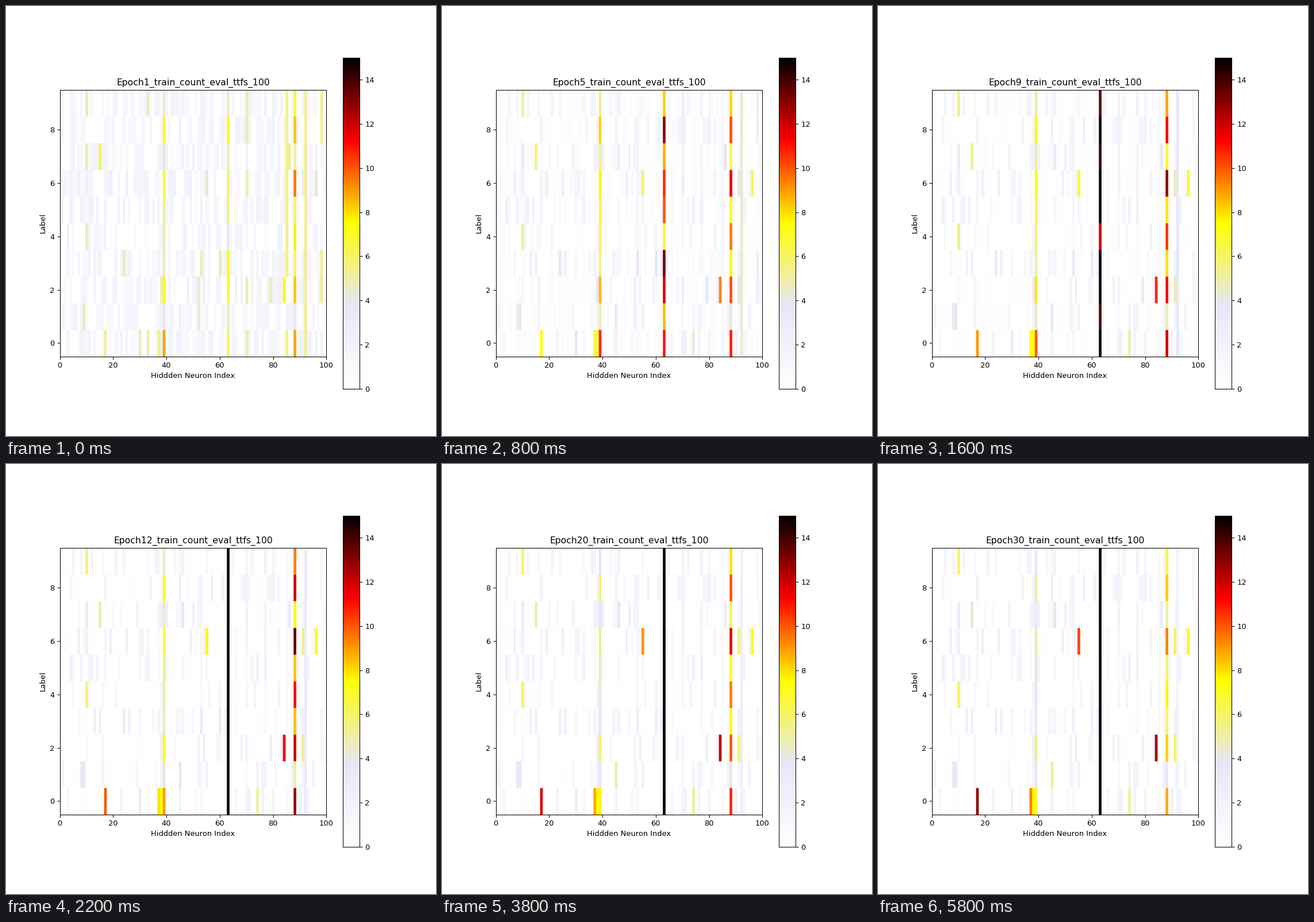
A matplotlib script for the animation above (6000 ms loop, 748 px wide and 748 px high).

```python
import numpy as np
import matplotlib.pyplot as plt
from matplotlib.animation import FuncAnimation
from matplotlib.colors import LinearSegmentedColormap

EPOCHS, LABELS, NEURONS, VMAX = 30, 10, 100, 15
ALL = range(LABELS)
epochs = np.arange(1, EPOCHS + 1)
rng = np.random.default_rng(4)


def curve(at, values):
    return np.interp(epochs, at, values)


def settle(start, end, tau):
    """Exponential approach from start to end."""
    return end + (start - end) * np.exp(-(epochs - 1) / tau)


def background():
    """Sparse weak cells that stay, plus early activity that dies out."""
    shape = (LABELS, NEURONS)
    chance = np.full(NEURONS, 0.15)
    chance[[37, 38, 45, 53, 70, 77]] = 0.7
    steady = (rng.random(shape) < chance) * rng.uniform(0.8, 2.2, shape)
    early = (rng.random(shape) < 0.45) * rng.uniform(0.6, 2, shape)
    fade = settle(1, 0.05, 3)[:, None, None]
    return np.maximum(steady, early * fade)


counts = background()


def drift(neuron, labels, start, end, tau):
    for label in labels:
        counts[:, label, neuron] = settle(start, end, tau)


# Neurons that fire early for many labels, then go quiet.
drift(92, ALL, 5.5, 1.5, 12)
drift(85, [0, 3, 4, 5, 6, 7, 8, 9], 5.6, 0.8, 2)
drift(70, [0, 2, 6, 8, 9], 4.9, 1.6, 3)
drift(98, [2, 3, 8, 9], 5.5, 1.3, 3)
drift(52, [1, 2], 4.4, 1.6, 3)
drift(33, [0, 9], 4.8, 0.8, 2)
drift(10, [7], 5, 3.2, 2)
drift(86, [7], 5, 3, 5)
for label, neuron in [(0, 30), (2, 38), (2, 79), (3, 24), (3, 53), (3, 60)]:
    drift(neuron, [label], 4.8, 2.2, 8)

# Neurons that specialise on one label.
drift(17, [0], 5.2, 14, 14)
drift(37, [0], 5.5, 10, 14)
drift(38, [0], 3, 7.6, 3)
drift(74, [0], 1.8, 5.2, 3)
drift(8, [1], 2, 3.4, 3)
drift(9, [1], 4.8, 3, 14)
drift(45, [1], 2, 5.8, 14)
drift(84, [2], 7, 12.8, 8)
drift(10, [4, 9], 4.8, 6.3, 12)
drift(55, [6], 4.4, 12, 20)
drift(91, [2, 6], 2.8, 6.2, 8)
drift(96, [6], 4.3, 7.4, 5)
drift(15, [7], 6, 4, 18)
drift(46, [7], 2, 4.1, 10)

# Hub neurons: one strength per label times a shared course.
hub39 = np.array([10.7, 5, 8.5, 5.4, 6, 6.3, 7.6, 5.2, 8.1, 5.3])
hub63 = np.array([10.9, 8.4, 11.8, 13.4, 6.5, 10, 10.5, 8.7, 12.9, 8.2])
hub88 = np.array([12.7, 5, 11.9, 8.4, 11.1, 8.3, 13.6, 7.3, 11.9, 9.4])
decay = curve([1, 5, 9, 12, 17, 30], [0.83, 1, 0.93, 0.84, 0.73, 0.64])
swell = curve([1, 5, 9, 12, 17, 24, 30],
              [0.7, 0.85, 0.94, 1, 0.91, 0.76, 0.69])
rise = curve([1, 5], [0.55, 1])
climb = 1.35 * np.maximum(epochs - 5, 0)
counts[:, :, 39] = np.outer(decay, hub39)
counts[:, :, 63] = np.outer(rise, hub63) + climb[:, None]
counts[:, :, 88] = np.outer(swell, hub88)


def cells(i):
    # Oversampled so that cell edges fall between pixels.
    return np.kron(counts[i], np.ones((100, 10)))


cmap = LinearSegmentedColormap.from_list(
    "heat", ["white", "lavender", "yellow", "red", "black"])
fig, ax = plt.subplots(figsize=(8, 8), dpi=93.5)
image = ax.imshow(cells(0), cmap=cmap, vmin=0, vmax=VMAX, origin="lower",
                  extent=(-0.5, NEURONS - 0.5, -0.5, LABELS - 0.5),
                  aspect=10, interpolation="hanning",
                  interpolation_stage="rgba")
ax.set_xlim(0, NEURONS)
ax.set_xlabel("Hiddden Neuron Index")
ax.set_ylabel("Label")
title = ax.set_title("")
fig.colorbar(image, ax=ax)


def draw(i):
    image.set_data(cells(i))
    title.set_text(f"Epoch{epochs[i]}_train_count_eval_ttfs_100")
    return image, title


anim = FuncAnimation(fig, draw, frames=EPOCHS, interval=200,
                     repeat=True, repeat_delay=0)
plt.show()
```
